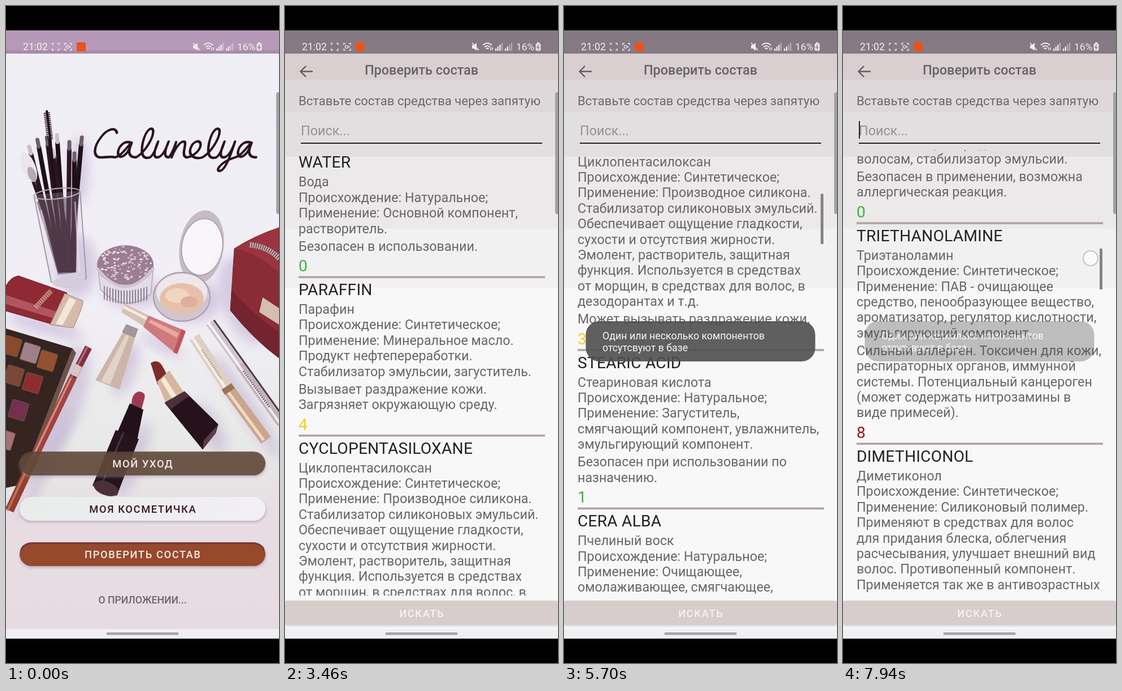
These frames come from a looping animation (483 px wide and 1159 px high, 8000 ms). An HTML page:

```html
<!DOCTYPE html>
<html lang="ru">
<head>
<meta charset="utf-8">
<title>Проверить состав</title>
<style>
html, body { margin: 0; width: 100%; height: 100%; overflow: hidden; background: #000; }
svg { display: block; width: 100%; height: 100%; font-family: Roboto, sans-serif; }
.btn { font-weight: 500; font-size: 18.3px; letter-spacing: 1.6px; text-anchor: middle; }
.head { letter-spacing: .2px; }
</style>
</head>
<body>
<svg id="stage" viewBox="0 0 483 1159"></svg>
<script>
const LOOP = 8000, FIRST = 100, STEP = 140;

// ---------- markup helpers ----------
const text = (x, y, s, size, fill, more = '') =>
  `<text x="${x}" y="${y}" font-size="${size}" fill="${fill}" ${more}>${s}</text>`;
const rect = (x, y, w, h, fill, r = 0, more = '') =>
  `<rect x="${x}" y="${y}" width="${w}" height="${h}" rx="${r}" fill="${fill}" ${more}/>`;
const oval = (x, y, rx, ry, fill, more = '') =>
  `<ellipse cx="${x}" cy="${y}" rx="${rx}" ry="${ry}" fill="${fill}" ${more}/>`;
const poly = (points, fill, more = '') => `<polygon points="${points}" fill="${fill}" ${more}/>`;
const path = (d, stroke, w, more = 'fill="none"') =>
  `<path d="${d}" stroke="${stroke}" stroke-width="${w}" ${more}/>`;
const shape = (d, fill) => `<path d="${d}" fill="${fill}"/>`;
const shade = (x, y, rx, ry, turn = 0) =>
  oval(x, y, rx, ry, '#bfadd0', `opacity=".55" filter="url(#soft)" transform="rotate(${turn} ${x} ${y})"`);

let seed = 7;
const rnd = () => (seed = seed * 16807 % 2147483647) / 2147483647;

// ---------- home screen ----------
function brushes() {
  const tips = [[44, 260], [58, 248], [74, 244], [91, 240], [112, 252], [133, 244], [84, 266], [121, 272]];
  let s = path('M42 292 L100 455', '#2b1722', 6);
  tips.forEach(([x, y], i) => {
    const foot = 96 + i * 3.4;
    s += path(`M${x} ${y} L${foot} 470`, i % 2 ? '#1f0f17' : '#2c1620', 8);
    s += path(`M${x} ${y} l${(x - foot) * .06} -12`, i % 3 ? '#6d5f6c' : '#c9c0cc', 7, 'stroke-linecap="round"');
  });
  return s + path('M77 232 L100 455', '#1f0f17', 6) + path('M72 188 L78 236', '#3c2a36', 11, 'stroke-dasharray="2 1.4"')
    + path('M72 184 L79 240', '#24141c', 4)
    + oval(40, 284, 12, 28, '#ebe6ee', 'transform="rotate(-22 40 284)"')
    + oval(46, 297, 7, 14, '#b7a8bb', 'transform="rotate(-22 46 297)"');
}

const glass = () => shade(125, 460, 36, 55) + shade(130, 290, 16, 60) + brushes()
  + poly('54,345 128,336 124,470 92,474', '#33192a', 'opacity=".55"')
  + path('M49 333 L80 486 Q108 508 142 480 L131 326', '#a498ab', 2, 'fill="#cfc6da" fill-opacity=".2"')
  + path('M62 360 L84 466 M122 345 L130 470', '#efeaf4', 3, 'fill="none" opacity=".5"')
  + oval(90, 331, 41, 9, 'none', 'stroke="#b5aab9" stroke-width="2" transform="rotate(-6 90 331)"')
  + oval(111, 486, 29, 10, '#d5cddc', 'transform="rotate(-6 111 486)"');

function pot() {
  let s = shade(225, 505, 52, 26) + path('M163 462 L167 500 Q210 544 256 508 L261 462Z', '#b3a6b5', 1.5, 'fill="#e2dbe5"');
  for (let i = 0; i < 16; i++) s += path(`M${174 + i * 5} ${494 + 8 * Math.sin(i / 5)} v24`, '#8f8092', 2);
  s += oval(211, 457, 50, 35, '#9c7d92') + path('M161 462 Q211 528 261 462', '#cfc5d2', 5);
  for (let i = 0; i < 110; i++) {
    const a = rnd() * 6.28, r = Math.sqrt(rnd());
    s += oval(211 + 47 * r * Math.cos(a), 454 + 30 * r * Math.sin(a), 1 + rnd() * 2, 1.4, i % 3 ? '#d9c6d6' : '#f4edf4');
  }
  return s;
}

const compact = () => shade(330, 520, 50, 38)
  + oval(346, 425, 39, 65, '#c6bac5', 'transform="rotate(9 346 425)"')
  + oval(347, 425, 36, 50, '#f8f6fb', 'transform="rotate(9 347 425)" stroke="#a89ba8" stroke-width="1.5"')
  + oval(311, 513, 50, 43, '#d1c6d0', 'stroke="#a99ca9" stroke-width="2"')
  + oval(311, 505, 45, 33, '#ede6ec') + oval(311, 516, 39, 27, '#e6c0ab')
  + oval(303, 511, 21, 13, '#f0d6c0') + oval(324, 522, 15, 10, '#dfae9f');

const bag = () => shade(420, 520, 38, 80, -20)
  + path('M404 428 Q440 405 483 391 V621 Q438 588 397 537Z', '#6c2530', 1, 'fill="#9c343f"')
  + shape('M404 428 Q440 432 483 470 V621 Q438 588 397 537Z', '#8a2c36')
  + shape('M399 500 Q440 548 483 575 V621 Q438 588 397 537Z', '#74242f')
  + path('M430 421 Q464 424 484 446', '#c3b1b3', 9) + path('M430 421 Q464 424 484 446', '#5f3a40', 8, 'fill="none" stroke-dasharray="1.5 2.5"')
  + poly('454,514 483,533 483,562 448,540', '#d5beae');

function eyeshadow() {
  const pans = [[10, 600, '#8a4a2c'], [43, 612, '#a08088'], [73, 626, '#95502f'], [14, 652, '#7c4636'],
    [47, 665, '#8e2c30'], [22, 713, '#74304c'], [-2, 765, '#a4707a']];
  return shade(80, 720, 45, 130, 25) + poly('0,569 118,604 24,845 0,850', '#35241f') + poly('118,604 124,612 30,845 24,845', '#6c5348')
    + pans.map(([x, y, c]) => rect(x - 15, y - 16, 30, 32, c, 3, `stroke="#6b584a" transform="rotate(17 ${x} ${y})"`)).join('');
}

const rod = (x1, y1, x2, y2, w, c, hi) => path(`M${x1} ${y1} L${x2} ${y2}`, c, w)
  + path(`M${x1 - w * .2} ${y1} L${x2 - w * .2} ${y2}`, hi, w * .25);

const makeup = () =>
  // red tube with a gold cap
  shade(70, 565, 70, 14, 15) + path('M0 494 Q8 478 22 476 L108 506 L84 562 L0 538Z', '#6e1c25', 1, 'fill="#8f2a34"')
  + poly('0,510 92,540 88,552 0,526', '#b2555f') + path('M52 532 L80 502', '#c48d84', 9, 'fill="none" stroke-dasharray="3 1"')
  + path('M104 507 L136 520 Q138 526 119 568 L78 562Z', '#9b7f73', 1, 'fill="#d5bba9"') + poly('112,514 124,519 100,563 88,561', '#f4e6da')
  + eyeshadow()
  // pencil
  + shade(70, 810, 10, 110, 26)
  + rod(146, 602, 118, 656, 13, '#7d3140', '#b2707a') + rod(118, 656, 50, 796, 14, '#a0433e', '#d08d83')
  + rod(50, 796, 6, 890, 16, '#94402f', '#bb705c') + path('M129 634 L120 652', '#d9c7c2', 13)
  // cream tube
  + shade(212, 640, 18, 50, 20) + poly('208,574 229,582 201,677 158,660', '#cdb6a9') + poly('212,580 218,582 184,668 168,662', '#e2d3c8')
  + path('M213 562 L233 570 L228 584 L206 575Z', '#8c8088', 1, 'fill="#a3979e"')
  // lip gloss
  + shade(276, 598, 42, 10, 28) + poly('210,525 253,546 245,566 204,540', '#d8c0b3') + poly('209,529 250,549 248,554 207,533', '#f5ebe4')
  + poly('252,546 317,573 300,613 243,566', '#cf7a7c') + poly('256,553 306,577 302,585 252,558', '#e9a8a2')
  + poly('311,570 318,574 303,614 296,611', '#c0545c')
  // two long tubes
  + shade(425, 705, 16, 110, -33) + rod(333, 584, 393, 675, 20, '#ddd0c1', '#f6efe8') + rod(393, 675, 460, 766, 21, '#caa58c', '#efd9c5')
  + path('M390 671 L396 680', '#9b7258', 21) + path('M347 607 L381 658', '#a99382', 3, 'fill="none" stroke-dasharray="2 2"')
  + rod(361, 558, 414, 632, 17, '#cfc4cd', '#f8f4f8') + rod(414, 632, 488, 736, 18, '#c0b1ba', '#f1eaee')
  + path('M368 554 L490 724', '#4c3641', 3) + path('M420 644 L466 708', '#6d5861', 3, 'fill="none" stroke-dasharray="2 2"')
  // standing lipstick
  + shade(360, 745, 20, 50, -30) + shape('M256 630 Q268 622 276 634 L287 654 L268 668Z', '#7c2c2a')
  + poly('267,663 289,643 315,682 285,705', '#d5b79f') + poly('274,660 280,654 303,690 296,696', '#f7ead9')
  + path('M281 700 L316 680 L375 738 L371 752 L348 782Z', '#1d0d14', 1, 'fill="#26121a"') + poly('316,680 324,688 290,712 281,700', '#4b3039')
  + poly('350,766 374,740 371,754 348,782', '#5b3c46')
  // dark lipstick
  + shade(225, 800, 18, 70, 22) + shape('M222 704 Q222 682 236 680 Q248 682 245 692 L239 714Z', '#9c3b50')
  + poly('219,701 243,712 232,766 197,752', '#22111a') + poly('194,748 235,764 196,864 153,846', '#26131b')
  + oval(177, 851, 23, 12, '#4a3037', 'transform="rotate(20 177 851)"') + path('M208 752 L170 842', '#4c343e', 3);

// One relative pen stroke per letter, baseline to baseline.
const PEN = {
  C: 'm34 -42c-4 -10 -18 -8 -26 8c-10 18 -6 36 10 34c8 0 14 -2 22 0',
  a: 'c8 -2 14 -12 22 -25c-14 -5 -20 8 -19 16c2 14 18 10 20 -16c-3 14 -2 25 13 25',
  l: 'c12 -8 22 -30 20 -44c-2 -9 -13 -8 -14 18c0 20 6 30 18 26',
  u: 'c4 -4 7 -14 8 -27c-3 14 -4 27 4 27c8 0 12 -12 14 -27c-3 14 -4 27 6 27',
  n: 'c4 -6 6 -16 7 -26l-2 26c2 -14 8 -27 15 -27c8 0 -2 27 12 27',
  e: 'c10 -2 20 -12 18 -22c-2 -9 -15 -7 -16 8c0 12 12 18 24 14',
  y: 'c4 -4 7 -14 8 -27c-3 14 -4 27 4 27c8 0 12 -12 14 -27c-2 18 -5 46 -14 50c-10 2 -6 -14 20 -23'
};
const script = word => `<g role="img" aria-label="${word}" transform="translate(152 267) skewX(-12) scale(1.03)">`
  + path('M0 0' + [...word].map(c => PEN[c]).join(''), '#2b1419', 4.2, 'fill="none" stroke-linecap="round" stroke-linejoin="round"') + '</g>';

const pill = (y, fill, label, ink, more = '') =>
  rect(24, y + 3, 436, 42, '#9c8ea6', 21, 'opacity=".5" filter="url(#tight)"')
  + rect(24, y, 435, 42, fill, 21, more) + text(242.3, y + 27.5, label, 18.3, ink, 'class="btn"');

const home = () => rect(0, 84, 483, 1016, 'url(#wall)') + rect(0, 43, 483, 41, '#b699b9') + rect(0, 78, 483, 6, '#a98ba9')
  + glass() + pot() + compact() + bag() + makeup() + script('Calunelya')
  + pill(786, '#5b4330', 'МОЙ УХОД', '#f1e9e8', 'fill-opacity=".84"')
  + pill(866, 'url(#pale)', 'МОЯ КОСМЕТИЧКА', '#3b161d')
  + pill(946, '#97492c', 'ПРОВЕРИТЬ СОСТАВ', '#f3e9e8')
  + path('M27 960 Q28 950 45 948 H438 Q455 950 456 960', '#623540', 3, 'fill="none" opacity=".7"')
  + text(241.5, 1054, 'О ПРИЛОЖЕНИИ...', 17.6, '#6a6570', 'font-weight="500" text-anchor="middle"');

// ---------- search screen ----------
const SYN = 'Происхождение: Синтетическое;', NAT = 'Происхождение: Натуральное;';
const ITEMS = [
  ['WATER', 'Вода', [NAT, 'Применение: Основной компонент,', 'растворитель.'], ['Безопасен в использовании.'], 0],
  ['PARAFFIN', 'Парафин', [SYN, 'Применение: Минеральное масло.', 'Продукт нефтепереработки.', 'Стабилизатор эмульсии, загуститель.'],
    ['Вызывает раздражение кожи.', 'Загрязняет окружающую среду.'], 4],
  ['CYCLOPENTASILOXANE', 'Циклопентасилоксан', [SYN, 'Применение: Производное силикона.', 'Стабилизатор силиконовых эмульсий.',
    'Обеспечивает ощущение гладкости,', 'сухости и отсутствия жирности.', 'Эмолент, растворитель, защитная',
    'функция. Используется в средствах', 'от морщин, в средствах для волос, в', 'дезодорантах и т.д.'], ['Может вызывать раздражение кожи.'], 3],
  ['STEARIC ACID', 'Стеариновая кислота', [NAT, 'Применение: Загуститель,', 'смягчающий компонент, увлажнитель,', 'эмульгирующий компонент.'],
    ['Безопасен при использовании по', 'назначению.'], 1],
  ['CERA ALBA', 'Пчелиный воск', [NAT, 'Применение: Очищающее,', 'омолаживающее, смягчающее,', 'противовоспалительное,',
    'заживляющее, укрепляющее,', 'отбеливающее, придает блеск', 'волосам, стабилизатор эмульсии.'],
    ['Безопасен в применении, возможна', 'аллергическая реакция.'], 0],
  ['TRIETHANOLAMINE', 'Триэтаноламин', [SYN, 'Применение: ПАВ - очищающее', 'средство, пенообразующее вещество,',
    'ароматизатор, регулятор кислотности,', 'эмульгирующий компонент.'],
    ['Сильный аллерген. Токсичен для кожи,', 'респираторных органов, иммунной', 'системы. Потенциальный канцероген',
      '(может содержать нитрозамины в', 'виде примесей).'], 8],
  ['DIMETHICONOL', 'Диметиконол', [SYN, 'Применение: Силиконовый полимер.', 'Применяют в средствах для волос', 'для придания блеска, облегчения',
    'расчесывания, улучшает внешний вид', 'волос. Противопенный компонент.', 'Применяется так же в антивозрастных', 'средствах.'], ['Безопасен в использовании.'], 1]
];
const rank = n => n < 2 ? '#3cb43c' : n < 5 ? '#ecd21e' : '#a01218';

function list() {
  const LINE = 27.4;
  let y = 253.4, s = '';
  const row = line => text(24, (y + 8.2).toFixed(1), line, 23.3, '#686666');
  for (const [name, local, body, note, score] of ITEMS) {
    s += text(24, (y += 22) + 10, name, 28.2, '#212121', 'class="head"');
    y += 34.7;
    s += row(local);
    for (const line of body) { y += LINE; s += row(line); }
    note.forEach((line, i) => { y += i ? LINE : 31; s += row(line); });
    s += text(24, (y += 35) + 10, score, 28.2, rank(score));
    s += rect(24, (y += 19.8) - 1.6, 436, 3.6, '#b3a2a0');
  }
  return s;
}

const BANDS = [[84, '#d9cfd1'], [130, '#dfd8da'], [187, '#e2dfe1'], [266, '#ebe9e9'], [393, '#f2f1f2'], [497, '#f8f8f8']];

const search = () => rect(0, 43, 483, 41, '#857a83')
  + BANDS.map(([y, c]) => rect(0, y, 483, 1100 - y, c)).join('')
  + path('M49 115.5 H28 M37 106 L27.5 115.5 L37 125', '#5f5d60', 2.4)
  + text(241.5, 121, 'Проверить состав', 23.4, '#666266', 'font-weight="500" text-anchor="middle"')
  + text(24, 175, 'Вставьте состав средства через запятую', 22.1, '#6b686b')
  + text(28, 228, 'Поиск...', 23.4, '#949094', 'id="hint"')
  + `<g id="pasted" clip-path="url(#field)">${text(452, 228, 'Cera Alba, Triethanolamine, Dimethiconol', 23.4, '#333', 'text-anchor="end"')}</g>`
  + rect(28, 203, 2, 31, '#222', 0, 'id="caret"') + rect(28, 241, 427, 2, '#242424')
  + `<g clip-path="url(#listBox)"><g id="list">${list()}</g></g>`
  + rect(454, 265, 5, 97, '#868486', 0, 'id="thumb"')
  + rect(0, 1051, 483, 43, '#a9a0a6', 4, 'opacity=".45" filter="url(#tight)"')
  + rect(0, 1049, 483, 43, '#cf98a9', 4, 'id="find"')
  + text(242.3, 1077.8, 'ИСКАТЬ', 18.3, '#f6f2f4', 'class="btn"')
  + '<path id="drop" d="M29 235 L37.5 242.5 A12 12 0 1 1 20.5 242.5Z" fill="#332c35"/>'
  + '<g id="menu">' + rect(19, 138, 312, 58, '#8d858c', 2, 'opacity=".6" filter="url(#tight)"') + rect(18.5, 136.5, 311, 57, '#f9f8f9', 2, 'stroke="#d0cacf"')
  + '<g clip-path="url(#menuBox)"><circle id="ripple" cx="80" cy="167" r="44" fill="#e5dee8"/></g>'
  + text(38, 173, 'Вставить', 17.9, '#111', 'font-weight="500"') + text(142, 173, 'Буфер обмена', 17.9, '#111', 'font-weight="500"')
  + [158, 166, 174].map(y => oval(302.5, y, 2.5, 2.5, '#111')).join('') + '</g>'
  + '<g id="toast">' + rect(38.5, 556, 406, 71, '#4f4f4f', 24, 'fill-opacity=".9"')
  + text(68, 588, 'Один или несколько компонентов', 17.8, '#f7f7f7') + text(68, 609, 'отсутсвуют в базе', 17.8, '#f7f7f7') + '</g>';

// ---------- phone frame ----------
const bars = (x, n) => [0, 1, 2, 3].map(i =>
  rect(x + i * 3.6, 75 - i * 3.4, 2.3, 4 + i * 3.4, '#f0ecf0', 0, `opacity="${i < n ? 1 : .45}"`)).join('');
const corners = x => path(`M${x - 6} 69 v-3 h3 M${x + 3} 66 h3 v3 M${x + 6} 75 v3 h-3 M${x - 3} 78 h-3 v-3`, '#eeeaee', 1.4);

const frame = () => rect(0, 0, 483, 43, '#000') + rect(0, 1116, 483, 43, '#000')
  + text(30, 78, '21:02', 17.6, '#f3eff3') + corners(88) + corners(110)
  + rect(106.5, 69.8, 4.5, 4.5, 'none', 1, 'stroke="#eeeaee" stroke-width="1.2"') + shape('M111.5 72 l2.5 -2 v4z', '#eeeaee')
  + rect(125, 64, 16, 16, '#e8541a', 2)
  + shape('M331 69 h3 l5 -4 v14 l-5 -4 h-3z', '#f0ecf0') + path('M331 65 L343 78', '#f0ecf0', 1.8)
  + path('M350 69 Q358 62 366 69 M353 72.5 Q358 68 363 72.5 M355.5 75.5 Q358 73.5 360.5 75.5', '#f0ecf0', 2) + path('M364 73 v5 M367 73 v5', '#f0ecf0', 1.4)
  + bars(372, 3) + bars(389, 2) + text(409, 78, '16%', 17.4, '#f3eff3')
  + rect(443.5, 66, 9, 13, '#e6e1e6', 2) + rect(446, 64, 4, 2, '#e6e1e6') + path('M449 68 l-3 5 h3.5 l-2.5 4', '#857a83', 1.3)
  + rect(0, 1099, 483, 17, '#f0eff3') + rect(177.5, 1105, 128, 4.4, '#a6a2a9', 2.2)
  + rect(478, 152, 12, 215, '#a3a0a2', 4)
  + '<circle id="dot" r="13" fill="#fff" fill-opacity=".7" stroke="#c5bfd2" stroke-width="2"/>';

const clip = (id, x, y, w, h) => `<clipPath id="${id}">${rect(x, y, w, h, '#000')}</clipPath>`;
const blur = (id, n) => `<filter id="${id}" x="-50%" y="-50%" width="200%" height="200%"><feGaussianBlur stdDeviation="${n}"/></filter>`;
const ramp = (id, dir, stops) => `<linearGradient id="${id}" ${dir}>`
  + stops.map(([at, c]) => `<stop offset="${at}" stop-color="${c}"/>`).join('') + '</linearGradient>';

document.getElementById('stage').innerHTML = '<defs>'
  + blur('soft', 10) + blur('tight', 2)
  + clip('listBox', 0, 254, 483, 786) + clip('field', 28, 200, 427, 40) + clip('menuBox', 19, 137, 310, 56) + clip('screen', 0, 43, 483, 1073)
  + ramp('wall', 'x2="0" y2="1"', [[0, '#f0eef5'], [.45, '#f1eef6'], [.6, '#ebebec'], [.7, '#e6e8e6'], [.8, '#e7dde3'], [1, '#e6dbe0']])
  + ramp('pale', '', [[0, '#e7ede9'], [.6, '#eeeef1'], [1, '#f2eff6']])
  + '</defs><g clip-path="url(#screen)">' + home() + `<g id="search">${search()}</g></g>` + frame();

// ---------- motion ----------
const $ = id => document.getElementById(id);
const clamp = v => Math.max(0, Math.min(1, v));
const show = (id, on) => $(id).setAttribute('visibility', on ? 'inherit' : 'hidden');
const fade = (id, o) => $(id).setAttribute('opacity', clamp(o).toFixed(3));

function track(keys, v) {
  const i = keys.findIndex(k => k[0] >= v);
  if (i < 0) return keys[keys.length - 1][1];
  if (!i) return keys[0][1];
  const [a, p] = keys[i - 1], [b, q] = keys[i];
  return p + (q - p) * (v - a) / (b - a);
}

const SCROLL = [[5000, 0], [5140, 63], [5560, 505], [5700, 540], [5840, 557], [6120, 566], [6680, 566], [7100, 1003], [7520, 1003], [7940, 1405]];
const BAR_TOP = [[63, 265], [566, 335], [1003, 381], [1405, 428]];
const BAR_LEN = [[63, 97], [566, 88], [1003, 85], [1405, 72]];
// start, end, x from, x to, finger y plus scroll
const SWIPES = [[5000, 5560, 290, 398, 946], [6680, 7100, 340, 414, 1443], [7520, 7940, 350, 438, 1850]];
const SHOWN = 3320, PASTE = 2480;

function touch(t, s) {
  if (t >= 800 && t < 1220) return [159.5, 233.5];
  const swipe = SWIPES.find(([a, b]) => t >= a && t <= b);
  if (!swipe) return null;
  const [a, b, from, to, hold] = swipe;
  return [from + (to - from) * (t - a) / (b - a), hold - s];
}

function draw(time) {
  const t = time < FIRST ? 0 : FIRST + STEP * Math.floor((time - FIRST) / STEP);
  const s = track(SCROLL, t), found = t >= SHOWN, pasted = t >= PASTE && !found;
  const menu = t >= 1500 && t < PASTE;
  fade('search', (t - 480) / 320);
  show('search', t > 480);
  show('hint', !pasted);
  show('pasted', pasted);
  show('list', found);
  $('list').setAttribute('transform', `translate(0 ${-s.toFixed(1)})`);
  show('thumb', t > 5000);
  $('thumb').setAttribute('y', track(BAR_TOP, s));
  $('thumb').setAttribute('height', track(BAR_LEN, s));
  show('caret', found && (t + 200) % 1000 < 500);
  $('find').setAttribute('fill', found ? '#d6cdcc' : t >= 2760 && t < 2900 ? '#c88ca0' : '#cf98a9');
  show('drop', menu);
  show('menu', menu);
  fade('menu', t < 2000 ? (t - 1400) / 240 : 1 - (t - 2200) / 280);
  show('ripple', menu && t >= 1920);
  $('ripple').setAttribute('r', 44 * clamp((t - 1780) / 420));
  fade('toast', t < 6000 ? (t - 3915) / 350 : 1 - (t - 7680) / 420);
  const p = touch(t, s);
  show('dot', p);
  if (p) $('dot').setAttribute('transform', `translate(${p[0].toFixed(1)} ${p[1].toFixed(1)})`);
}

const start = performance.now();
function tick() {
  draw((performance.now() - start) % LOOP);
  requestAnimationFrame(tick);
}
tick();
</script>
</body>
</html>
```
